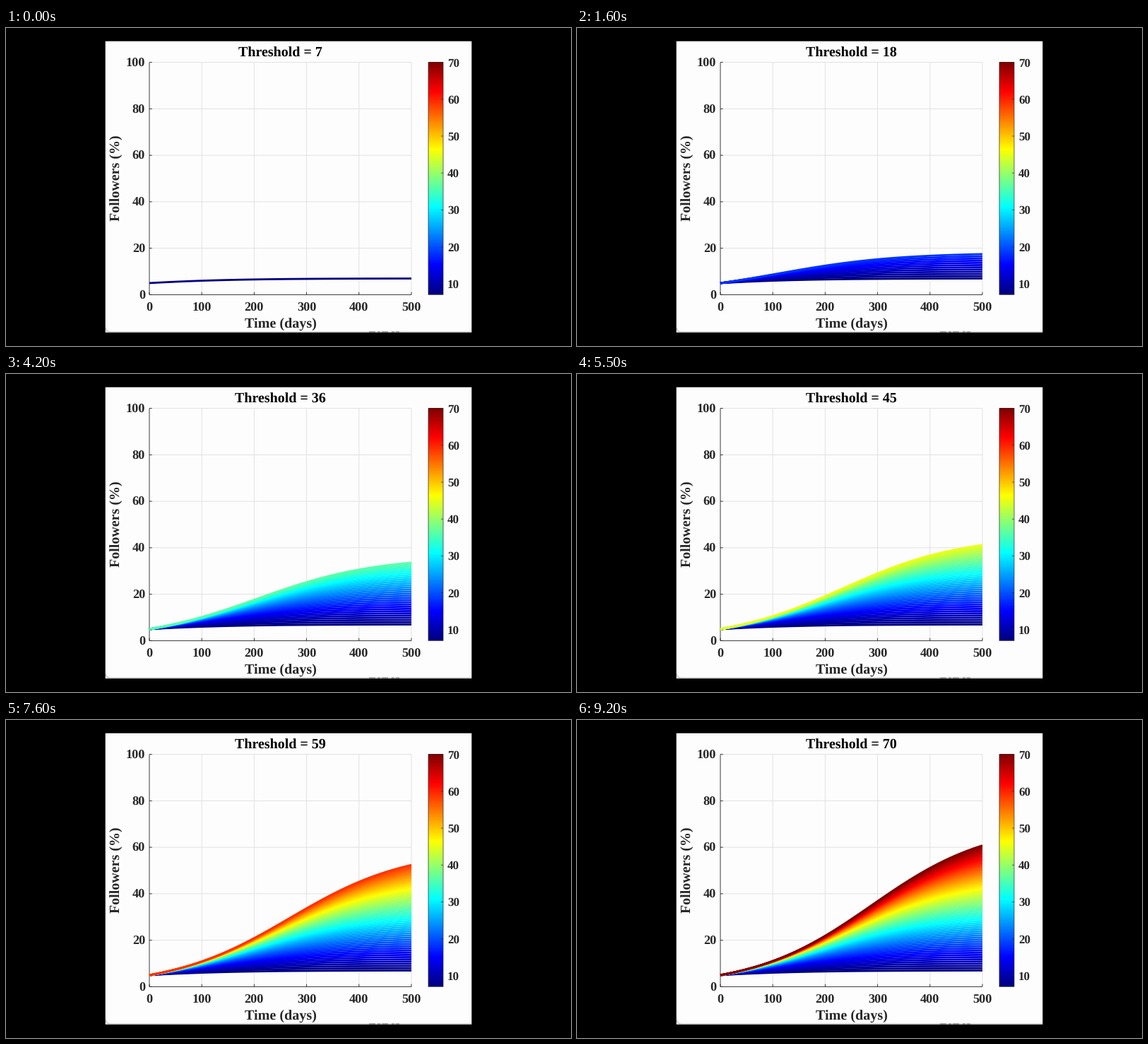
These frames come from a looping animation (800x450 px, 9300 ms). A matplotlib script:

```python
import numpy as np
import matplotlib.pyplot as plt
from matplotlib.animation import FuncAnimation
from matplotlib.collections import LineCollection
from matplotlib.patches import PathPatch, Rectangle
from matplotlib.path import Path

W, H, DPI = 800, 450, 100
FRAMES, INTERVAL = 93, 100
STEP_MS, LEAD_MS = 145, 10
PX = 72 / DPI  # points per pixel

LEFT, RIGHT, TOP, BOTTOM = 203, 574, 48.6, 377.4
BAR_L, BAR_R = 598, 619
K_MIN, K_MAX = 7, 70
START, RATE = 5, 0.0089
INK, GRID = "#262626", "#dfdfdf"

plt.rcParams["font.family"] = "Liberation Serif"
plt.rcParams["font.weight"] = "bold"
plt.rcParams["text.hinting"] = "none"

fig = plt.figure(figsize=(W / DPI, H / DPI), dpi=DPI, facecolor="black")
ax = fig.add_axes([0, 0, 1, 1])
ax.axis("off")


def sx(day):
    return LEFT + (RIGHT - LEFT) * day / 500


def sy(percent):
    return BOTTOM - (BOTTOM - TOP) * percent / 100


def bar_y(k):
    return BOTTOM - (BOTTOM - TOP) * (k - K_MIN) / (K_MAX - K_MIN)


def jet(v):
    v = np.asarray(v, float)[..., None]
    return np.clip(1.5 - np.abs(4 * v - np.array([3, 2, 1])), 0, 1)


def line(x, y, color=INK, z=2, width=0.9):
    ax.plot(x, y, color=color, lw=width * PX, zorder=z,
            solid_capstyle="butt", snap=False)


def label(x, y, text, size, ha="center", va="baseline", color=INK, **kw):
    return ax.text(x, y, text, fontsize=size * PX, ha=ha, va=va,
                   color=color, zorder=6, **kw)


# White panel with the shaded lower edge of a cropped window
ax.add_patch(Rectangle((140.7, 18.7), 518.6, 412.1, color="#fdfdfd", lw=0,
                       zorder=0, snap=False))
edge = Path([(141.3, 424), (141.3, 430), (148, 430), (659, 430)],
            [Path.MOVETO, Path.CURVE3, Path.CURVE3, Path.LINETO])
ax.add_patch(PathPatch(edge, fc="none", ec="#b4b4b4", lw=PX, zorder=1,
                       snap=False))
for a, b in ((514, 523), (526, 530), (532, 541), (546, 550), (552, 557)):
    line([a, b], [430, 430], "#555555")

# Grid, axes and ticks
for day in range(0, 501, 100):
    x = sx(day)
    if day:
        line([x, x], [TOP, BOTTOM], GRID, 1)
    line([x, x], [BOTTOM, BOTTOM - 3.7])
    label(x, 401, str(day), 18.3)
for pct in range(0, 101, 20):
    y = sy(pct)
    if pct:
        line([LEFT, RIGHT], [y, y], GRID, 1)
    line([LEFT, LEFT + 3.7], [y, y])
    label(197, y + 6.2, str(pct), 18.3, "right")
line([LEFT, LEFT], [TOP, BOTTOM])
line([LEFT, RIGHT], [BOTTOM, BOTTOM])

label(389, 425, "Time (days)", 20.1)
label(165.6, 212.3, "Followers (%)", 20, "right", "center", rotation=90)
title = label(388.7, 41, "", 20, color="black")

# Colour bar
ramp = jet(np.linspace(1, 0, 256))[:, None, :]
ax.imshow(ramp, extent=(BAR_L, BAR_R, BOTTOM, TOP), aspect="auto",
          interpolation="nearest", zorder=2)
line([BAR_L, BAR_R, BAR_R, BAR_L, BAR_L], [TOP, TOP, BOTTOM, BOTTOM, TOP],
     z=3, width=0.7)
for k in range(10, 71, 10):
    line([BAR_R - 3, BAR_R], [bar_y(k)] * 2, z=4, width=0.7)
    label(625, bar_y(k) + 5.8, str(k), 17, "left")

# One logistic curve per threshold
days = np.linspace(0, 500, 251)
levels = np.arange(K_MIN, K_MAX + 1)
curves = [np.column_stack([sx(days),
                           sy(k / (1 + (k / START - 1) * np.exp(-RATE * days)))])
          for k in levels]
colors = jet((levels - K_MIN) / (K_MAX - K_MIN))
bundle = LineCollection([], linewidths=2.8 * PX, capstyle="butt", zorder=5)
ax.add_collection(bundle, autolim=False)

ax.set_xlim(0, W)
ax.set_ylim(H, 0)


def draw(i):
    n = min(int((i * INTERVAL + LEAD_MS) // STEP_MS) + 1, len(levels))
    bundle.set_segments(curves[:n])
    bundle.set_color(colors[:n])
    title.set_text(f"Threshold = {levels[n - 1]}")
    return bundle, title


anim = FuncAnimation(fig, draw, frames=FRAMES, init_func=lambda: draw(0),
                     interval=INTERVAL, repeat=True, repeat_delay=0, blit=False)
plt.show()
```
